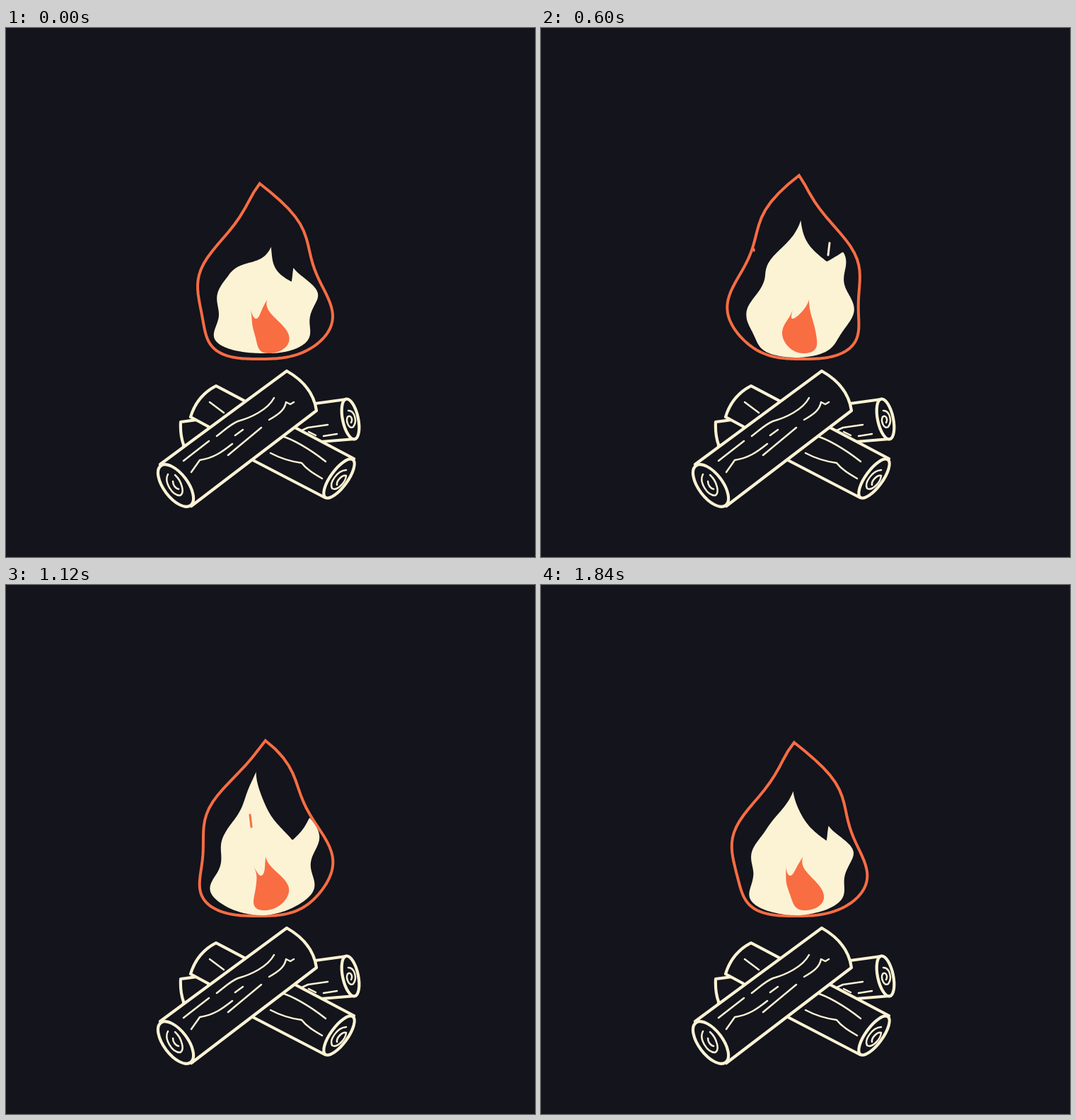
Write an HTML page that moves like this. It is 748 by 748 pixels and loops after 1.88 s.

```html
<!DOCTYPE html>
<html lang="en">
<head>
<meta charset="utf-8">
<title>Campfire</title>
<style>
html, body { margin: 0; width: 100%; height: 100%; overflow: hidden; background: #13141c; }
svg { display: block; width: 100vw; height: 100vh; }
path, ellipse { stroke-linecap: round; stroke-linejoin: round; }
.log { fill: #13141c; stroke: #fcf3d4; stroke-width: 4.2; }
.grain { fill: none; stroke: #fcf3d4; stroke-width: 2.5; }
#halo { fill: none; stroke: #f96d43; stroke-width: 4; stroke-linejoin: miter; }
#flame { fill: #fcf3d4; }
#ember { fill: #f96d43; }
#sparks path { fill: none; stroke-width: 3; }
</style>
</head>
<body>
<svg viewBox="0 0 748 748">
  <g id="back">
    <path class="log" d="M481 525L247 557Q246 575 251 589L251 601L494 581Z"/>
    <ellipse class="log" cx="487" cy="553" rx="29" ry="11" transform="rotate(78 487 553)"/>
    <path class="grain" d="M484 541C493 541 497 556 491 564C485 568 480 556 483 550C487 546 491 553 488 558M455 561L427 565 416 570M468 574L449 577M428 571L438 576"/>
  </g>
  <g id="middle">
    <path class="log" d="M297 506L492 609 451 664 349 611 285 563 261 550Q270 520 297 506Z"/>
    <ellipse class="log" cx="471" cy="637" rx="33" ry="12" transform="rotate(-54 471 637)"/>
    <path class="grain" d="M481 625C468 626 457 643 461 651C468 655 480 643 481 633C476 631 467 640 468 646M288 529L308 544M390 577C404 581 428 594 452 613M374 601C389 609 403 613 418 615C425 624 435 630 447 637"/>
  </g>
  <g id="front">
    <path class="log" d="M218 617L397 485Q434 506 439 541L262 676Z"/>
    <ellipse class="log" cx="240" cy="647" rx="35" ry="17" transform="rotate(53 240 647)"/>
    <path class="grain" d="M229 631C223 642 235 661 246 661C253 658 249 641 239 632M236 641C236 647 240 651 244 652M251 612L287 584M298 577C312 566 318 560 328 556C346 551 370 540 379 523M262 628L274 611C294 608 306 599 320 588M324 576L335 568M314 604L361 565M372 554C386 546 394 540 396 529L402 532 407 529"/>
  </g>
  <path id="halo"/>
  <path id="flame"/>
  <path id="ember"/>
  <g id="sparks"></g>
</svg>
<script>
const LOOP = 1880, SWAY = LOOP / 2, STEP = 40, TAU = 2 * Math.PI;
const NS = "http://www.w3.org/2000/svg";
const $ = id => document.getElementById(id);
const clamp = x => Math.max(0, Math.min(1, x));
const polygon = points => "M" + points.join("L") + "Z";

// Upward travelling wave: peaks at height y0 when the cycle reaches `peak` degrees.
const wave = (t, y, y0, peak, degPerPx) =>
  Math.cos(TAU * (t / SWAY - (peak - degPerPx * (y - y0)) / 360));

// Once per loop: a value swinging around mid, highest at share q of the loop.
const swing = (t, mid, size, q) => mid + size * Math.cos(TAU * (t / LOOP - q));

// Samples a path and moves every point.
const scratch = document.createElementNS(NS, "path");
function warp(d, move, count = 260) {
  scratch.setAttribute("d", d);
  const step = scratch.getTotalLength() / count;
  return polygon(Array.from({ length: count }, (_, i) => move(scratch.getPointAtLength(i * step))));
}

// Height of the outer tip as the fire gusts: time, y
const gusts = [[0, 220], [300, 233], [575, 208], [820, 230], [1140, 220], [1400, 230], [1710, 214], [LOOP, 224]];
function tipHeight(t) {
  const i = gusts.findIndex(g => g[0] > t);
  const [t0, y0] = gusts[i - 1], [t1, y1] = gusts[i];
  return y0 + (y1 - y0) * (1 - Math.cos(Math.PI * (t - t0) / (t1 - t0))) / 2;
}

// A teardrop swaying sideways.
function halo(t) {
  const top = tipHeight(t), height = 468 - top, n = 60;
  const points = Array.from({ length: 2 * n }, (_, i) => {
    const u = 1 - Math.abs(1 - i / n) ** 3;
    const half = 199 * u ** 0.93 * (1 - u) ** 0.36;
    const y = top + u * height;
    return [363 + (i < n ? half : -half) + 7 * wave(t, y, 360, 137, 2.5), y];
  });
  return polygon(points);
}

// Two drifting tips on a body whose sides bulge in and out together.
function flame(t) {
  const q = t / LOOP, base = 460 + 7 * clamp(t / 700);
  const x = 365 + 13 * Math.cos(4.5 * q) + 4 * wave(t, 0, 0, 150, 0);
  const y = 264 + 150 * (q - 0.55) ** 2;
  const notch = swing(t, 353, -23, 0.29), drop = notch - y;
  const sx = swing(t, 421, 12, 0.55), sy = swing(t, 330, -14, 0.36);
  const d = `M${x} ${y}C${x + 4} ${y + 0.45 * drop} 378 ${notch - 0.3 * drop} 402 ${notch}
    L${sx} ${sy}C${sx + 6} ${sy + 12} 437 365 437 385C437 420 433 462 365 ${base}
    C300 ${base} 288 435 295 408C299 385 306 370 314 350C322 325 ${x - 10} ${y + 30} ${x} ${y}Z`;
  return warp(d, p => [365 + (p.x - 365) * (1 + 0.085 * wave(t, p.y, 410, 180, 4.6)), p.y]);
}

const EMBER = `M373 384C373 404 395 415 395 436C395 452 384 460 369 460C354 460 347 450 347 432
  C347 416 354 412 352 395C353 405 354 411 357 411C363 411 370 395 373 384Z`;
const ember = t => warp(EMBER, p => [p.x + 6 * wave(t, p.y, 410, 130, 3.9), p.y]);

// Sparks return every REST ms, changing colour each time.
const REST = 760, LIFE = 160, COLOURS = ["#fcf3d4", "#f96d43"];
const sparks = [
  { x: 407, y: 321, lean: 1, start: 520, hue: 0 },
  { x: 302, y: 315, lean: 1, start: 590, hue: 1 },
  { x: 368, y: 342, lean: -1, start: 720, hue: 1 },
  { x: 346, y: 342, lean: -1, start: 1040, hue: 1 }
].map(s => ({ ...s, el: $("sparks").appendChild(document.createElementNS(NS, "path")) }));

function drawSpark({ x, y, lean, start, hue, el }, t) {
  const round = Math.floor((t - start) / REST);
  const u = (t - start - round * REST) / LIFE;
  const at = k => [x + lean * (2 * k - 1), y - 17 * k];
  el.setAttribute("stroke", COLOURS[Math.abs(round + hue) % 2]);
  el.setAttribute("d", u > 0 && u < 1 ? `M${at(clamp(2 * u - 1))}L${at(clamp(2 * u))}` : "");
}

function draw() {
  const t = Math.floor(performance.now() % LOOP / STEP) * STEP;
  for (const shape of [halo, flame, ember]) $(shape.name).setAttribute("d", shape(t));
  for (const s of sparks) drawSpark(s, t);
  requestAnimationFrame(draw);
}
draw();
</script>
</body>
</html>
```
